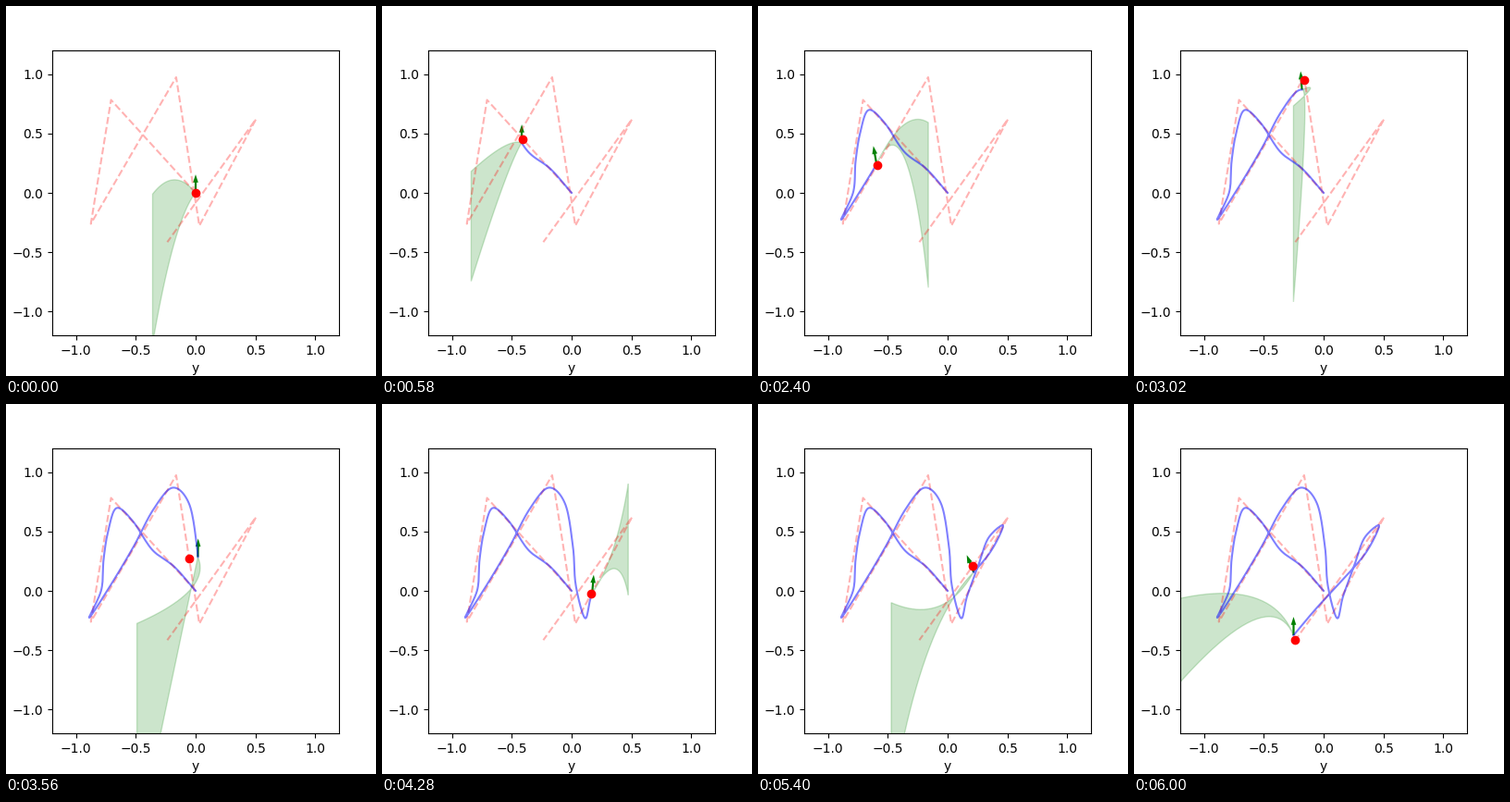
These frames come from a looping animation (400x400 px, 6.02 s). A matplotlib script:

```python
import numpy as np
import matplotlib.pyplot as plt
from matplotlib.animation import FuncAnimation
from matplotlib.patches import Polygon

FRAMES, STEP = 301, 20
LIM, THRUST = 1.2, .155
times = np.arange(FRAMES) * STEP / 1000

fig, ax = plt.subplots(figsize=(4, 4), dpi=100)
ax.set_xlim(-LIM, LIM)
ax.set_ylim(-LIM, LIM)
ax.set_xlabel("y")

# Reference: one straight leg per second
way = np.array([(0, 0), (-.708, .783), (-.877, -.261), (-.163, .974),
                (.031, -.277), (.505, .621), (-.237, -.415)])

# Flown path: stage pixels, one point every quarter second
flown = np.array([
    (205, 202), (182, 176), (158, 157.5), (137, 126.5),
    (119.5, 112.5), (110.5, 137), (105.5, 168), (103, 201),
    (90, 231), (113, 196), (138, 154), (159, 114.5),
    (180, 90.5), (198, 108), (206.5, 155), (209.5, 196),
    (219.5, 231.5), (226, 208), (238, 175), (249, 145),
    (265, 131.5), (250.5, 161), (221, 195), (197, 221), (172.5, 250)])

# Forecast poses: lean in degrees, then offsets of the top bend,
# the bottom bend and the end (x, top, bottom)
pose_t = [0, 1.26, 2.4, 3.56, 4.28, 5.4, 6]
poses = np.array([
    (0, -.18, .225, -.18, -.22, -.36, -.01, -1.27),
    (1, -.04, -.17, -.06, -.2, -.495, -.51, -1.045),
    (-10, .23, .48, .26, .6, .433, .35, -1.04),
    (1, .12, -.28, -.09, -.42, -.51, -.56, -2.44),
    (5, .2, .28, .22, .42, .302, .92, -.016),
    (-22, -.25, -.45, -.45, -.45, -.69, -.257, -1.95),
    (0, -.186, .486, -.2, .46, -.98, .304, -.43)])


def spline(t, dt, pts):
    """Smooth curve through evenly timed points."""
    m = np.gradient(pts, axis=0)
    i = np.minimum((t / dt).astype(int), len(pts) - 2)
    s = (t / dt - i)[:, None]
    return ((1 + 2 * s) * (1 - s)**2 * pts[i] + s * (1 - s)**2 * m[i]
            + s**2 * (3 - 2 * s) * pts[i + 1] + s**2 * (s - 1) * m[i + 1])


def blend(t, kt, rows):
    return np.array([np.interp(t, kt, col) for col in rows.T])


def bow(bend, end):
    """Quadratic curve from the origin."""
    s = np.linspace(0, 1, 25)[:, None]
    return 2 * s * (1 - s) * np.array(bend) + s**2 * np.array(end)


to_data = ax.transData.inverted().transform
path = spline(times, .25, to_data(np.c_[flown[:, 0], 400 - flown[:, 1]]))
goal = blend(times, np.arange(len(way)), way).T

ax.plot(*way.T, "r--", alpha=.3)
trace, = ax.plot([], [], "b-", alpha=.5)
dot, = ax.plot([], [], "ro")
tube = ax.add_patch(Polygon(np.zeros((3, 2)), color="green", alpha=.2))
arrow = ax.quiver([0], [0], [0], [THRUST], color="green", width=.007,
                  headwidth=2.6, headlength=4, headaxislength=4,
                  scale=1, scale_units="y")


def draw(i):
    pos = path[i]
    trace.set_data(*path[:i + 1].T)
    dot.set_data([goal[i, 0]], [goal[i, 1]])

    lean, *bends, x, top, low = blend(times[i], pose_t, poses)
    a = np.radians(lean)
    arrow.set_offsets([pos])
    arrow.set_UVC([THRUST * np.sin(a)], [THRUST * np.cos(a)])

    upper, lower = bow(bends[:2], (x, top)), bow(bends[2:], (x, low))
    tube.set_xy(pos + np.r_[upper, lower[::-1]])
    return trace, dot, arrow, tube


anim = FuncAnimation(fig, draw, frames=FRAMES, interval=STEP,
                     repeat=True, repeat_delay=0)
plt.show()
```
